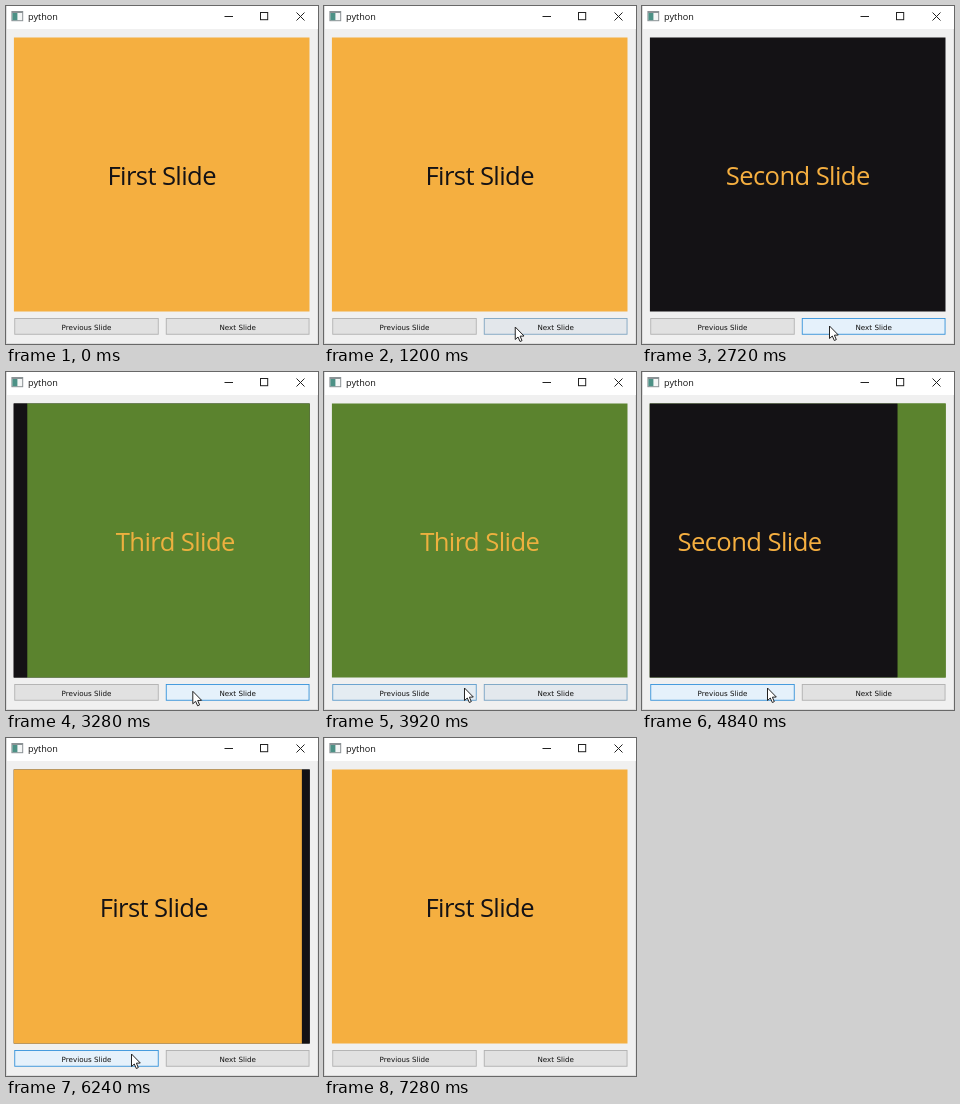
An HTML page with a canvas for the animation above (7.32 s loop, 312 px wide and 338 px high).

```html
<!DOCTYPE html>
<html lang="en">
<head>
<meta charset="utf-8">
<title>python</title>
<style>
html, body { margin: 0; width: 312px; height: 338px; overflow: hidden; background: #f0f0f0; }
canvas { display: block; }
</style>
</head>
<body>
<canvas id="stage" width="312" height="338"></canvas>
<script>
const ctx = document.getElementById('stage').getContext('2d');
const LOOP = 7320, SLIDE_MS = 500, FADE_MS = 300;
const VIEW = { x: 7.7, y: 31.5, w: 296, h: 274 };
const ORANGE = '#f5af40', BLACK = '#141215', GREEN = '#5b832e';
const SLIDE_FONT = '500 25.6px "Open Sans", sans-serif';

const slides = [
  { text: 'First Slide', back: ORANGE, ink: BLACK },
  { text: 'Second Slide', back: BLACK, ink: ORANGE },
  { text: 'Third Slide', back: GREEN, ink: '#edb03f' }
];
const moves = [
  { at: 1504, from: 0, to: 1 },
  { at: 2960, from: 1, to: 2 },
  { at: 4614, from: 2, to: 1 },
  { at: 5890, from: 1, to: 0 }
];
const buttons = [
  { text: 'Previous Slide', x: 8.3, w: 144.4, over: [3720, 6720], press: [4520, 5800] },
  { text: 'Next Slide', x: 159.8, w: 143.7, over: [1080, 3760], press: [1410, 2870] }
];
// time, x, y of the pointer tip
const path = [
  [960, 204, 339], [1240, 190, 320], [1720, 189, 320], [2720, 187, 320],
  [3600, 186, 319], [3920, 140, 316], [4240, 125, 316], [6500, 125, 316], [6820, 136, 339]
];

const clamp = v => Math.max(0, Math.min(1, v));
const outCubic = t => 1 - (1 - t) ** 3;
const smooth = t => t * t * (3 - 2 * t);

function rect(x, y, w, h, color) {
  ctx.fillStyle = color;
  ctx.fillRect(x, y, w, h);
}

function label(text, x, y, font, color, align = 'center', spacing = 0) {
  ctx.font = font;
  ctx.letterSpacing = spacing + 'px';
  ctx.textAlign = align;
  ctx.fillStyle = color;
  ctx.fillText(text, x, y);
}

function line(points, color) {
  ctx.beginPath();
  points.forEach(([x, y], i) => i ? ctx.lineTo(x, y) : ctx.moveTo(x, y));
  ctx.strokeStyle = color;
  ctx.lineWidth = 1;
  ctx.stroke();
}

function mix(a, b, k) {
  return `rgb(${a.map((v, i) => Math.round(v + (b[i] - v) * k))})`;
}

function drawFrame() {
  rect(0, 0, 312, 338, '#f0f0f0');
  rect(0, 0, 312, 23, '#fff');
  rect(0, 0, 1, 338, '#dcdcdc');
  rect(311, 23, 1, 315, '#e2e2e2');
  rect(0, 337, 312, 1, '#dcdcdc');

  rect(5.4, 5, 11.8, 10.2, '#8b9295');
  rect(6.4, 7, 9.8, 7.2, '#f4f6f6');
  rect(6.4, 7, 5, 7.2, '#4c9186');
  label('python', 22, 14.2, '500 9.1px "Open Sans", sans-serif', '#111', 'left');

  line([[218.5, 10.5], [227, 10.5]], '#222');
  ctx.strokeRect(254.5, 6.5, 7.2, 7.2);
  line([[290.5, 6.5], [298.5, 14.5]], '#222');
  line([[298.5, 6.5], [290.5, 14.5]], '#222');
}

function drawSlide(slide, dx) {
  rect(VIEW.x + dx, 0, VIEW.w, 338, slide.back);
  label(slide.text, VIEW.x + VIEW.w / 2 + dx, 179.2, SLIDE_FONT, slide.ink, 'center', -0.6);
}

function drawSlides(t) {
  const move = moves.filter(m => m.at <= t).pop() || { at: -SLIDE_MS, from: 1, to: 0 };
  const dir = Math.sign(move.to - move.from);
  const shift = VIEW.w * outCubic(clamp((t - move.at) / SLIDE_MS));
  const moving = shift < VIEW.w;
  ctx.save();
  ctx.beginPath();
  ctx.rect(VIEW.x, VIEW.y, VIEW.w, VIEW.h);
  ctx.clip();
  if (moving) {
    // backdrop keeps the seam between the slides closed
    rect(0, 0, 312, 338, slides[move.from].back);
    drawSlide(slides[move.from], -dir * shift);
  }
  drawSlide(slides[move.to], dir * (VIEW.w - shift));
  ctx.restore();
}

function drawButton(b, t) {
  const hover = clamp((t - b.over[0]) / FADE_MS) - clamp((t - b.over[1]) / FADE_MS);
  const pressed = b.press.some(p => t >= p && t < p + 90);
  rect(b.x, 312, b.w, 16.7, pressed ? '#2a6ea5' : mix([176, 176, 176], [52, 146, 218], hover));
  rect(b.x + 0.9, 312.9, b.w - 1.8, 14.9, pressed ? '#cce4f7' : mix([225, 225, 225], [229, 241, 251], hover));
  label(b.text, b.x + b.w / 2, 324, '7.15px "DejaVu Sans", sans-serif', '#111');
}

function drawPointer(t) {
  const i = path.findIndex(p => p[0] > t);
  if (i < 1) return;
  const a = path[i - 1], b = path[i];
  const k = smooth((t - a[0]) / (b[0] - a[0]));
  ctx.save();
  ctx.translate(a[1] + (b[1] - a[1]) * k + 0.5, a[2] + (b[2] - a[2]) * k);
  ctx.beginPath();
  [[0, 0], [0, 12.5], [2.8, 10], [4.8, 14.5], [6.8, 13.6], [4.9, 9.2], [8.8, 9]]
    .forEach(([x, y]) => ctx.lineTo(x, y));
  ctx.closePath();
  ctx.fillStyle = '#fff';
  ctx.fill();
  ctx.strokeStyle = '#222';
  ctx.lineWidth = 1;
  ctx.stroke();
  ctx.restore();
}

const start = performance.now();
function draw(now) {
  const t = Math.max(0, now - start) % LOOP;
  drawFrame();
  drawSlides(t);
  buttons.forEach(b => drawButton(b, t));
  drawPointer(t);
  requestAnimationFrame(draw);
}
draw(start);
</script>
</body>
</html>
```
